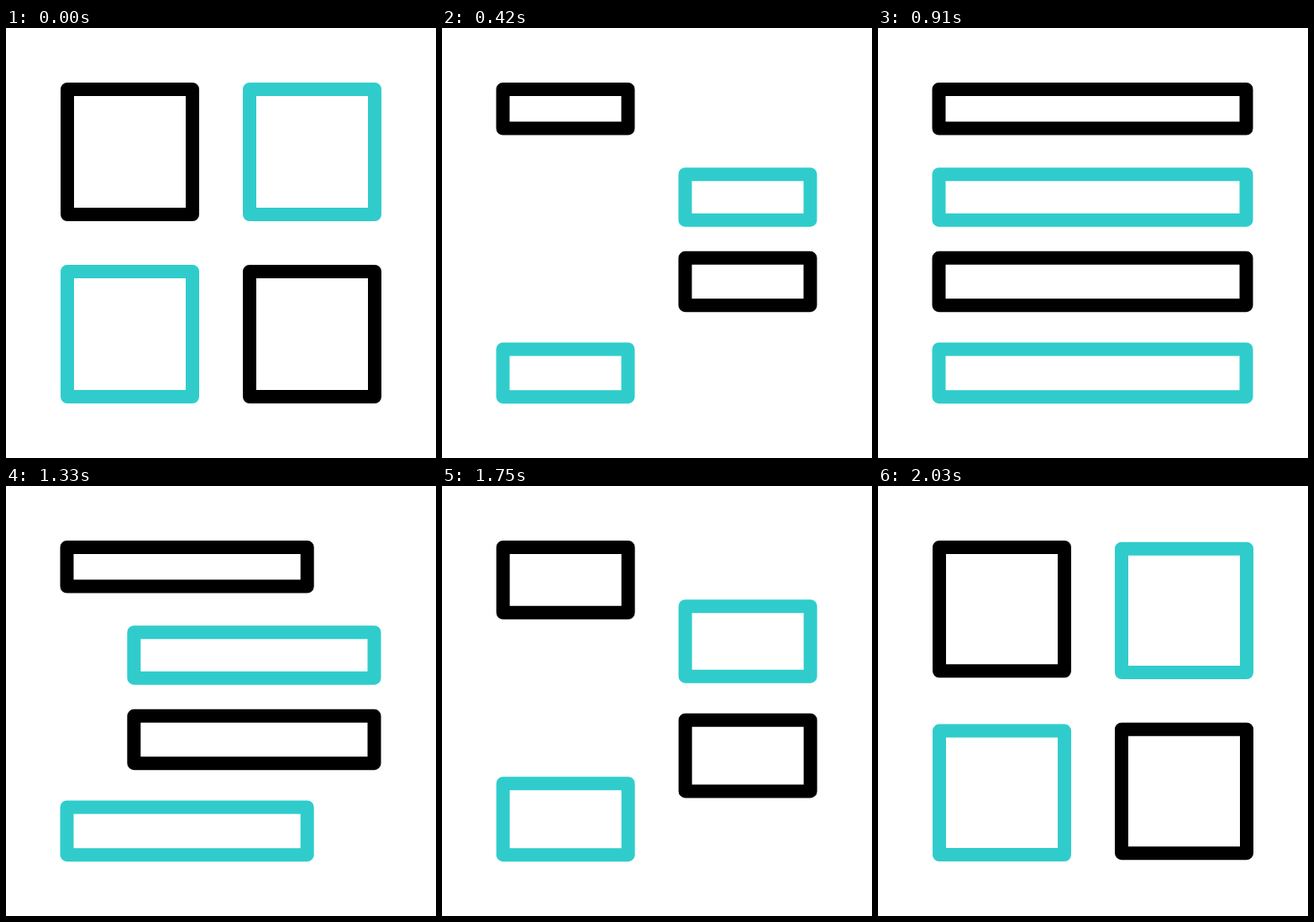
An HTML page that plays this animation: 512 by 512 pixels, repeating every 2100 ms.

```html
<!DOCTYPE html>
<html>
<head>
<meta charset="utf-8">
<style>
html, body { margin: 0; height: 100%; overflow: hidden; background: #fff; }
svg { display: block; width: 100vw; height: 100vh; }
rect { fill: none; stroke: #000; stroke-width: 16; stroke-linejoin: round; }
rect:nth-child(even) { stroke: #30cccc; }
</style>
</head>
<body>
<svg viewBox="0 0 512 512"></svg>
<script>
const LOOP = 2100, STEP = 70;
const EDGE = 73, PITCH = 217, SIDE = 149;

// Top and bottom of each flattened tile, from the highest down
const bars = [[73, 119.5], [174.2, 228.7], [273.8, 330.2], [382.5, 439.2]];

const svg = document.querySelector('svg');
const rects = bars.map(() =>
  svg.appendChild(document.createElementNS('http://www.w3.org/2000/svg', 'rect')));

function ease(t, start, end) {
  const p = Math.min(1, Math.max(0, (t - start) / (end - start)));
  return p * p * p * (10 - 15 * p + 6 * p * p);
}

const mix = (a, b, k) => a + (b - a) * k;

function draw(now) {
  const t = Math.floor((now % LOOP) / STEP) * STEP;
  const flat = ease(t, 0, 430) - ease(t, 1520, 2105);
  const wide = ease(t, 426, 896) - ease(t, 1135, 1590);
  bars.forEach(([top, bottom], i) => {
    const row = i >> 1, col = row ^ (i & 1);
    const squareTop = EDGE + PITCH * row;
    const y = mix(squareTop, top, flat);
    const box = {
      x: EDGE + PITCH * col * (1 - wide) - flat / 2,
      y,
      width: SIDE + PITCH * wide,
      height: mix(squareTop + SIDE, bottom, flat) - y
    };
    for (const key in box) rects[i].setAttribute(key, box[key]);
  });
}

const begin = performance.now();
function tick() {
  draw(performance.now() - begin);
  requestAnimationFrame(tick);
}
tick();
</script>
</body>
</html>
```
